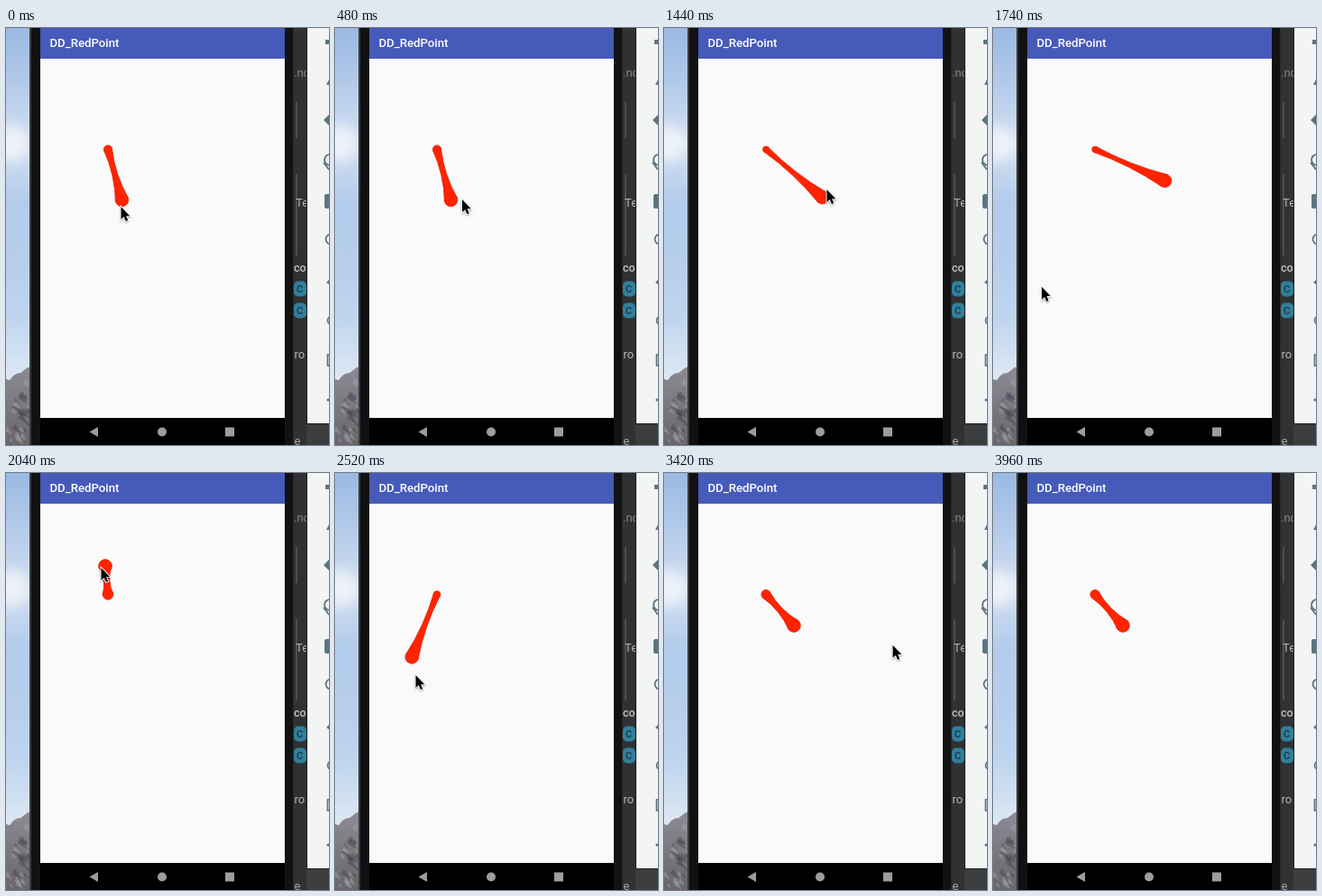
Recreate the animation shown at these times as an HTML page with a canvas. Size 358 by 462 pixels, loop 4320 ms.

```html
<!DOCTYPE html>
<html lang="en">
<head>
<meta charset="utf-8">
<title>Red point</title>
<style>
html, body { margin: 0; width: 100%; height: 100%; overflow: hidden; background: #2f3133; }
canvas { display: block; width: 358px; height: 462px; }
</style>
</head>
<body>
<canvas id="stage"></canvas>
<script>
const W = 358, H = 462, LOOP = 4320, STEP = 60, LAST = 66;
const dpr = window.devicePixelRatio || 1;

function layer(canvas) {
  canvas.width = W * dpr;
  canvas.height = H * dpr;
  const c = canvas.getContext('2d');
  c.scale(dpr, dpr);
  return c;
}

const ctx = layer(document.getElementById('stage'));
const backdrop = document.createElement('canvas');
const bg = layer(backdrop);

function rect(color, x, y, w, h) {
  bg.fillStyle = color;
  bg.fillRect(x, y, w, h);
}

function rounded(color, x, y, w, h, r) {
  bg.fillStyle = color;
  bg.beginPath();
  bg.roundRect(x, y, w, h, r);
  bg.fill();
}

function poly(c, color, ...pts) {
  c.fillStyle = color;
  c.beginPath();
  for (let i = 0; i < pts.length; i += 2) c.lineTo(pts[i], pts[i + 1]);
  c.closePath();
  c.fill();
}

function disc(c, color, x, y, r) {
  c.fillStyle = color;
  c.beginPath();
  c.arc(x, y, r, 0, Math.PI * 2);
  c.fill();
}

function ring(x, y, r) {
  bg.beginPath();
  bg.arc(x, y, r, 0, Math.PI * 2);
  bg.stroke();
}

function label(str, x, y, font, color) {
  bg.font = font;
  bg.fillStyle = color;
  bg.fillText(str, x, y);
}

function drawSky() {
  const sky = bg.createLinearGradient(0, 0, 0, 385);
  ['#9ab9e2', '#b4cbea', '#d3e0f1', '#b3cceb', '#b6ceec', '#bfd5ee', '#dce7f3']
    .forEach((color, i, all) => sky.addColorStop(i / (all.length - 1), color));
  rect(sky, 0, 0, 28, H);

  bg.save();
  bg.filter = 'blur(7px)';
  disc(bg, 'rgba(244,247,250,.8)', 6, 128, 20);
  bg.restore();
  drawMountain();
}

function drawMountain() {
  let seed = 7;
  const random = () => (seed = (seed * 16807) % 2147483647) / 2147483647;
  const rock = bg.createLinearGradient(0, 376, 0, H);
  rock.addColorStop(0, '#8c8b93');
  rock.addColorStop(1, '#68666c');
  const ridge = x => 391 - x * 0.6;
  const outline = [0, H];
  for (let x = 0; x <= 28; x += 4) outline.push(x, ridge(x) + random() * 4 - 2);
  poly(bg, rock, ...outline, 28, H);

  for (let i = 0; i < 26; i++) {
    const x = random() * 26, y = ridge(x) + 6 + random() * 66, s = 3 + random() * 5;
    poly(bg, i % 2 ? 'rgba(166,163,168,.5)' : 'rgba(70,68,76,.5)',
      x, y, x + s, y + s * 1.8, x - s * 0.4, y + s);
  }
}

function drawEditor() {
  rect('#2f3133', 309, 0, 49, H);
  rect('#6b6d6f', 321.5, 82, 1, 40);
  rect('#6b6d6f', 321.5, 162, 1, 90);

  bg.save();
  bg.beginPath();
  bg.rect(319, 0, 14, H);
  bg.clip();
  const font = '13px Roboto, sans-serif';
  label('.nd', 319, 54, font, '#85888a');
  label('Te', 321, 198, font, '#b4b6b8');
  label('co', 319, 270, '500 12.5px Roboto, sans-serif', '#c0c2c4');
  label('ro', 319.5, 366, font, '#b4b6b8');
  for (const y of [289, 313]) {
    rounded('#317f9b', 319, y - 8.5, 14, 17, 5);
    label('C', 322, y + 4, '500 11px Roboto, sans-serif', '#1d3540');
  }
  bg.restore();
  rect('#3b3d3f', 333, 438, 25, 24);
  label('e', 319.5, 462, font, '#a4a7a9');
}

function drawToolbar() {
  rect('#1c1d1e', 333, 0, 25, 439);
  rect('#f3f4f4', 334, 0, 24, 438);
  const ink = '#5a7480';
  rect(ink, 354, 13, 4, 5);
  poly(bg, ink, 355, 63, 358, 57, 358, 63);
  poly(bg, ink, 352, 102, 358, 96, 358, 108);
  rounded(ink, 353, 184, 10, 16, 2);

  bg.strokeStyle = ink;
  bg.lineWidth = 1.8;
  ring(359, 146, 6);
  bg.beginPath();
  bg.moveTo(352, 149);
  bg.lineTo(358, 157);
  bg.stroke();
  ring(360, 234, 5.5);
  poly(bg, ink, 355, 282, 358, 279, 358, 284);
  ring(361, 324, 4.5);
  bg.strokeRect(356.5, 362, 8, 12);
  disc(bg, ink, 357, 412, 1.6);
}

function drawPhone() {
  rect('#3b3c3d', 26, 0, 2, H);
  rect('#111', 28, 0, 10, H);
  rect('#fafafa', 38, 34, 271, 398);
  rect('#465ab9', 38, 0, 271, 34);
  rect('#000', 38, 432, 271, 30);
  rect('#121212', 309, 0, 10, H);
  rect('#292a2b', 318, 0, 1, H);
  label('DD_RedPoint', 48.5, 21, '500 13.2px Roboto, sans-serif', '#fff');

  const nav = '#9d9d9d';
  poly(bg, nav, 92.5, 447.5, 102, 442, 102, 453);
  disc(bg, nav, 173, 447.5, 5);
  rect(nav, 243, 442.5, 10, 10);
}

// Turning points of the pointer: step, x, y
const path = [
  [0, 127, 197], [9, 154, 202], [12, 318, 390], [15, 190, 53],
  [17, 132, 189], [21, 157, 205], [24, 180, 178], [27, 178, 168],
  [30, 18, 327], [33, 110, 103], [34, 105, 104], [38, 75, 150],
  [42, 89, 223], [45, 95, 280], [49, 134, 199], [53, 144, 169],
  [55, 165, 139], [58, 276, 230], [63, 133, 437], [66, 117, 475]
];

function slope(i, axis) {
  const a = path[Math.max(0, i - 1)], b = path[Math.min(path.length - 1, i + 1)];
  // Stand still at turning points so the path never overshoots.
  const turn = (path[i][axis] - a[axis]) * (b[axis] - path[i][axis]);
  return turn <= 0 ? 0 : (b[axis] - a[axis]) / (b[0] - a[0]);
}

function pointer(step) {
  let i = 0;
  while (i < path.length - 2 && path[i + 1][0] <= step) i++;
  const a = path[i], b = path[i + 1], span = b[0] - a[0];
  const u = (step - a[0]) / span, u2 = u * u, u3 = u2 * u;
  return [1, 2].map(k =>
    (2 * u3 - 3 * u2 + 1) * a[k] + (3 * u2 - 2 * u3) * b[k] +
    (u3 - 2 * u2 + u) * span * slope(i, k) + (u3 - u2) * span * slope(i + 1, k));
}

// The blob trails the pointer by one step while held, and rests where it is let go.
const drags = [{ from: 17, to: 26 }, { from: 33, to: 53 }];

function blobAt(step) {
  const drag = drags.filter(d => d.from < step).pop();
  return drag ? pointer(Math.min(step - 1, drag.to)) : [128.5, 190.5];
}

function drawBlob([x, y]) {
  const ox = 113, oy = 134.5, r = 7.3;
  const dx = x - ox, dy = y - oy, d = Math.hypot(dx, dy) || 1;
  const small = Math.max(1.5, r - d * 0.047);
  const nx = -dy / d, ny = dx / d, mx = (x + ox) / 2, my = (y + oy) / 2;

  const shape = new Path2D();
  shape.arc(ox, oy, small, 0, Math.PI * 2);
  shape.closePath();
  shape.moveTo(x + r, y);
  shape.arc(x, y, r, 0, Math.PI * 2);
  shape.closePath();
  shape.moveTo(ox - nx * small, oy - ny * small);
  shape.quadraticCurveTo(mx, my, x - nx * r, y - ny * r);
  shape.lineTo(x + nx * r, y + ny * r);
  shape.quadraticCurveTo(mx, my, ox + nx * small, oy + ny * small);
  shape.closePath();

  ctx.strokeStyle = '#c41c08';
  ctx.lineWidth = 0.8;
  ctx.stroke(shape);
  ctx.fillStyle = '#ff2300';
  ctx.fill(shape);
}

function drawPointer([x, y]) {
  ctx.save();
  ctx.translate(x, y + 0.5);
  ctx.shadowColor = 'rgba(0,0,0,.3)';
  ctx.shadowBlur = 2 * dpr;
  ctx.shadowOffsetY = dpr;
  const arrow = [0.5, 0.5, 0.5, 14.5, 3.7, 11.6, 5.9, 16.6, 8.2, 15.6, 6.1, 10.7, 10.3, 10.7];
  poly(ctx, '#000', ...arrow);
  ctx.strokeStyle = '#fff';
  ctx.lineWidth = 1.8;
  ctx.stroke();
  ctx.shadowColor = 'transparent';
  poly(ctx, '#000', ...arrow);
  ctx.restore();
}

function draw(now) {
  const step = Math.min(LAST, Math.floor((now % LOOP) / STEP));
  ctx.drawImage(backdrop, 0, 0, W, H);
  drawBlob(blobAt(step));
  drawPointer(pointer(step));
}

drawSky();
drawEditor();
drawToolbar();
drawPhone();

const start = performance.now();
function tick() {
  draw(performance.now() - start);
  requestAnimationFrame(tick);
}
tick();
</script>
</body>
</html>
```
